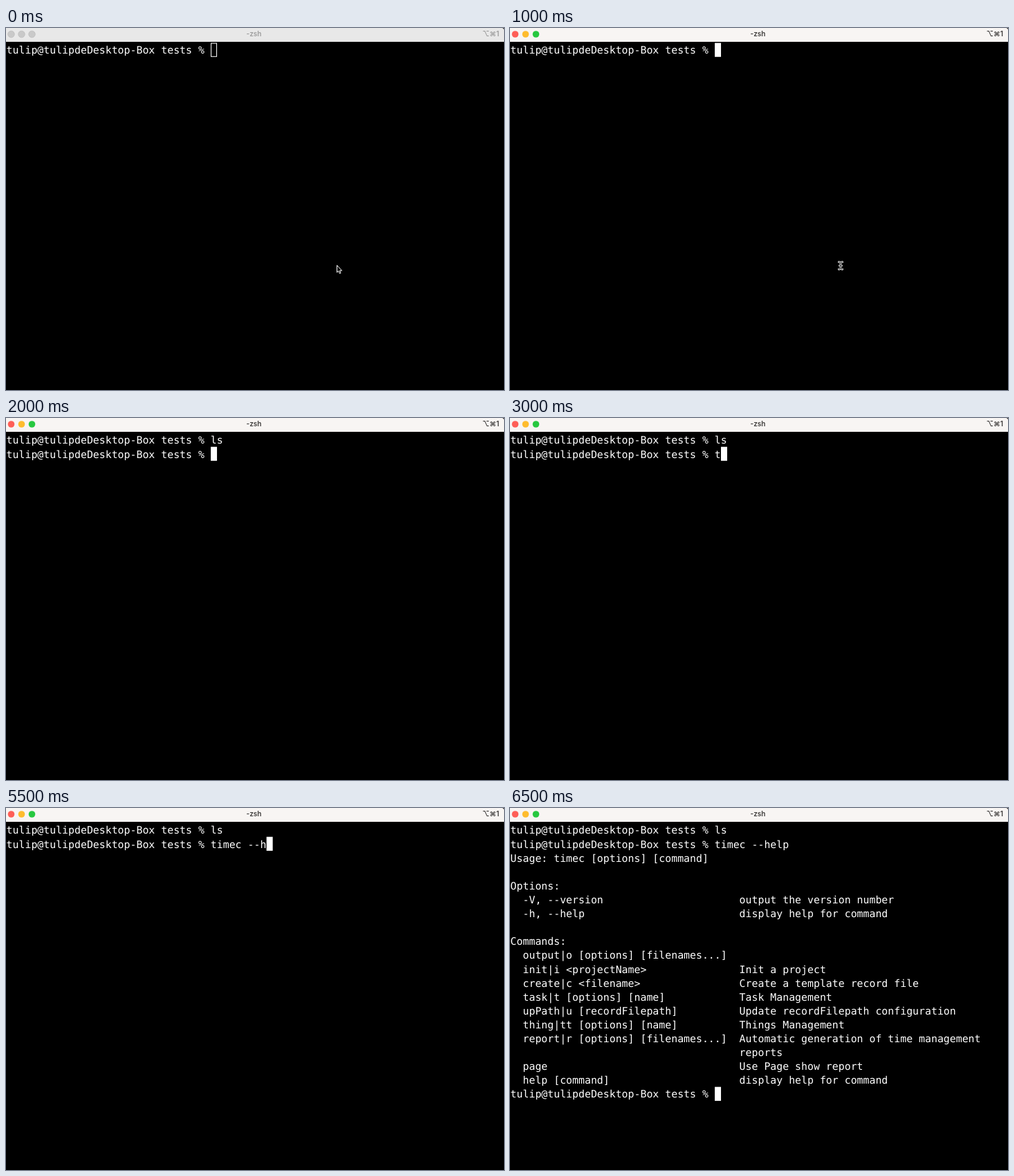
Animation, 720 px wide and 524 px high, one loop 8000 ms. Source, as an HTML page:

```html
<!DOCTYPE html>
<html lang="en">
<head>
<meta charset="utf-8">
<title>Terminal</title>
<style>
  html, body { margin: 0; width: 100%; height: 100%; overflow: hidden; background: #000; }
  svg { display: block; }
  .bar { font: 600 10px Inter, "DejaVu Sans", sans-serif; }
  #screen text {
    font: 14.87px "DejaVu Sans Mono", monospace;
    fill: #fff;
    white-space: pre;
    text-rendering: geometricPrecision;
  }
</style>
</head>
<body>
<svg width="720" height="524" viewBox="0 0 720 524">
  <path id="bar" d="M0 0H717Q720 0 720 3V20H0Z"/>
  <g id="lights">
    <circle cx="7.5" cy="9" r="4.8"/>
    <circle cx="22.5" cy="9" r="4.8"/>
    <circle cx="37.5" cy="9" r="4.8"/>
  </g>
  <g id="labels" class="bar">
    <text x="358.5" y="12.3" text-anchor="middle">-zsh</text>
    <text x="713" y="12.3" text-anchor="end">⌥⌘1</text>
  </g>
  <g id="screen"></g>
  <rect id="cursor"/>
  <path id="arrow" d="M478.5 343.5V353.8L480.8 351.7L482.4 355.4L484 354.7L482.5 351.2H485.6Z"
        fill="#000" stroke="#fff"/>
  <g id="beam" fill="none" stroke-linecap="round">
    <path id="beamLine" d="M475.3 338.8Q478 338.8 478 340.5Q478 338.8 480.7 338.8M478 340.5V347.5M475.3 349.2Q478 349.2 478 347.5Q478 349.2 480.7 349.2M476.5 344H479.5"
          stroke="#ddd" stroke-width="2.4"/>
    <use href="#beamLine"/>
    <path d="M475.3 338.8Q478 338.8 478 340.5Q478 338.8 480.7 338.8M478 340.5V347.5M475.3 349.2Q478 349.2 478 347.5Q478 349.2 480.7 349.2M476.5 344H479.5"
          stroke="#222" stroke-width=".9"/>
  </g>
</svg>
<script>
const $ = id => document.getElementById(id);
const LOOP = 8000, CELL = 8.953, ROW = 20.11, LEFT = 0.6;
const prompt = "tulip@tulipdeDesktop-Box tests % ";

const entry = (name, text = "") => ("  " + name).padEnd(37) + text;
const help = [
  "Usage: timec [options] [command]",
  "",
  "Options:",
  entry("-V, --version", "output the version number"),
  entry("-h, --help", "display help for command"),
  "",
  "Commands:",
  entry("output|o [options] [filenames...]"),
  entry("init|i <projectName>", "Init a project"),
  entry("create|c <filename>", "Create a template record file"),
  entry("task|t [options] [name]", "Task Management"),
  entry("upPath|u [recordFilepath]", "Update recordFilepath configuration"),
  entry("thing|tt [options] [name]", "Things Management"),
  entry("report|r [options] [filenames...]", "Automatic generation of time management"),
  entry("", "reports"),
  entry("page", "Use Page show report"),
  entry("help [command]", "display help for command")
];

// Keystrokes arrive in bursts: [time, text typed so far]
const firstInput = [[0, ""], [1500, "l"]];
const secondInput = [
  [2000, ""], [3000, "t"], [3500, "time"], [4000, "timec "],
  [5500, "timec --h"], [6000, "timec --hel"]
];
const typed = (steps, t) => steps.filter(([start]) => start <= t).pop()[1];

function screenLines(t) {
  if (t < 2000) return [prompt + typed(firstInput, t)];
  const done = prompt + "ls";
  if (t < 6500) return [done, prompt + typed(secondInput, t)];
  return [done, prompt + "timec --help", ...help, prompt];
}

function setAttrs(el, attrs) {
  for (const name in attrs) el.setAttribute(name, attrs[name]);
}

const rows = Array.from({ length: 20 }, (_, i) => {
  const row = document.createElementNS("http://www.w3.org/2000/svg", "text");
  setAttrs(row, { x: LEFT, y: 37.4 + i * ROW });
  return $("screen").appendChild(row);
});

function drawWindow(active) {
  $("bar").setAttribute("fill", active ? "#f8f5f3" : "#e8e8e8");
  $("labels").setAttribute("fill", active ? "#3b3938" : "#9c9c9c");
  const colors = active ? ["#fe5f57", "#febc2e", "#28c840"] : Array(3).fill("#c9c9c9");
  [...$("lights").children].forEach((light, i) =>
    setAttrs(light, { fill: colors[i], stroke: active ? "none" : "#b8b8b8", "stroke-width": 0.6 }));
}

function drawCursor(row, col, active) {
  const inset = active ? 0 : 0.5;
  setAttrs($("cursor"), {
    x: LEFT + col * CELL + inset,
    y: 21.6 + row * ROW + inset,
    width: 9 - 2 * inset,
    height: 20.2 - 2 * inset,
    fill: active ? "#fff" : "none",
    stroke: active ? "none" : "#fff"
  });
}

function draw(now) {
  const t = now % LOOP, active = t >= 1000;
  const lines = screenLines(t);
  rows.forEach((row, i) => {
    const text = lines[i] || "";
    if (row.textContent !== text) row.textContent = text;
  });
  drawWindow(active);
  drawCursor(lines.length - 1, lines[lines.length - 1].length, active);
  $("arrow").style.display = active ? "none" : "";
  $("arrow").setAttribute("transform", t < 500 ? "" : "translate(-.4 -.4)");
  $("beam").style.display = active && t < 1500 ? "" : "none";
  requestAnimationFrame(draw);
}
draw(0);
</script>
</body>
</html>
```
